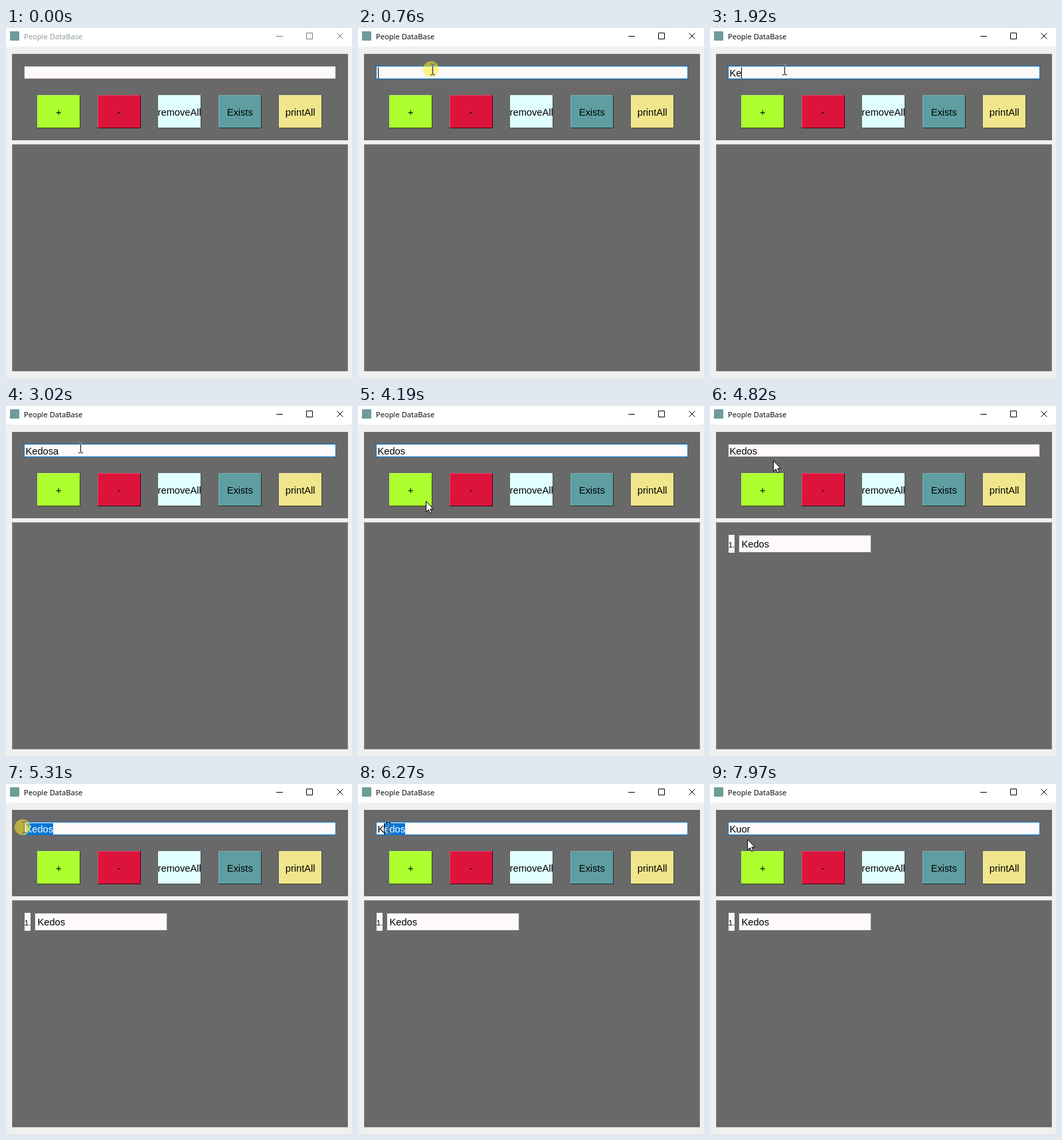
Write an HTML page that moves like this. It is 521 px wide and 527 px high and loops after 7990 ms.

```html
<!DOCTYPE html>
<html lang="en">
<head>
<meta charset="utf-8">
<title>People DataBase</title>
<style>
  html, body { margin: 0; width: 100%; height: 100%; overflow: hidden; background: #f0f0f0; }
  svg { display: block; }
  text { font: 14.667px "Liberation Sans", Arial, sans-serif; fill: #000; white-space: pre; }
  #title { font: 11.2px "Open Sans", "Noto Sans", sans-serif; }
  #beam { fill: none; stroke: #fff; mix-blend-mode: difference; }
  .mid { text-anchor: middle; }
</style>
</head>
<body>
<svg width="521" height="527" viewBox="0 0 521 527">
  <rect width="521" height="527" fill="#f0f0f0"/>
  <rect width="521" height="28" fill="#fff"/>
  <rect x="6" y="5" width="14" height="14" fill="#6d9c9c"/>
  <text id="title" x="27" y="17">People DataBase</text>
  <path id="chrome" d="M407 12.5H417M452.5 7.5H461.5V16.5H452.5ZM498.5 7.5L507.5 16.5M507.5 7.5L498.5 16.5" fill="none"/>

  <rect x="9" y="39" width="506" height="130" fill="#696969"/>
  <rect x="9.5" y="175.5" width="505" height="341" fill="#696969" stroke="#828790"/>
  <g id="buttons"></g>

  <rect id="field" x="27.5" y="57.5" width="469" height="19" fill="#fffafa"/>
  <rect id="mark" y="59" height="17" fill="#0078d7"/>
  <text x="29.5" y="73"><tspan id="plain"></tspan><tspan id="picked" fill="#fff"></tspan></text>
  <rect id="caret" y="59" width="1" height="17"/>

  <g id="item">
    <rect x="28" y="194" width="9" height="27" fill="#fffafa"/>
    <text x="27.7" y="213" style="font-size:11.5px">1.</text>
    <rect x="43.5" y="194.5" width="199" height="26" fill="#fffafa" stroke="#7a7a7a"/>
    <text x="47.5" y="213">Kedos</text>
  </g>

  <circle id="halo" r="12" fill="#fff01e" fill-opacity=".53"/>
  <path id="beam" d="M-3 -8.5H0M1 -8.5H4M-3 7.5H0M1 7.5H4M.5 -8V7"/>
  <path id="arrow" d="M.5 .5V16.5L4.2 13L6.8 18.6L9.2 17.5L6.7 12H11.5Z" fill="#fff" stroke="#000"/>
</svg>
<script>
const LOOP = 7990, BLINK = 530, TEXT_X = 29.5;
const CLICK = 760, ADD = 4340, GRAB = 4980, DROP = 6200, RETYPE = 7010;

const $ = id => document.getElementById(id);
const set = (id, attrs) => { for (const k in attrs) $(id).setAttribute(k, attrs[k]); };
const show = (id, on) => set(id, { visibility: on ? 'visible' : 'hidden' });
const between = (t, a, b) => t >= a && t < b;

const BUTTONS = { '+': '#adff2f', '-': '#dc143c', removeAll: '#e0ffff', Exists: '#5f9ea0', printAll: '#f0e68c' };
$('buttons').innerHTML = Object.entries(BUTTONS).map(([label, face], i) => {
  const x = 47 + 91 * i;
  return `<rect x="${x}" y="101" width="65" height="50" fill="${face}"/>
    <path d="M${x + .5} 150V101.5H${x + 64}" fill="none" stroke="#fff" stroke-opacity=".2"/>
    <path d="M${x} 150.5H${x + 64.5}V101" fill="none" stroke="#000" stroke-opacity=".7"/>
    <text class="mid" x="${x + 32.2}" y="132">${label}</text>`;
}).join('');

// bursts of keys: start, gap between keys, characters kept, keys
const BURSTS = [
  [1640, 0, 0, 'K'], [1920, 105, 1, 'edo'], [2420, 0, 4, 'sa'], [3360, 0, 5, ''],
  [RETYPE, 100, 1, 'uo'], [7270, 0, 3, 'r']
];
// pointer moves: start, end, and where they lead
const MOVES = [
  [20, 610, 112, 63], [3950, 4190, 102, 143], [4190, 4290, 95, 131], [4480, 4690, 98, 84],
  [4800, GRAB, 75, 67], [GRAB, 5360, 20, 66], [5550, 5860, 45, 67], [7850, 7970, 56, 83]
];

const pen = document.createElement('canvas').getContext('2d');
pen.font = '14.667px "Liberation Sans", Arial, sans-serif';
const endX = s => TEXT_X + pen.measureText(s).width;

function typedAt(t) {
  let text = '';
  for (const [start, gap, keep, keys] of BURSTS) {
    if (t < start) break;
    const count = gap ? Math.floor((t - start) / gap) + 1 : keys.length;
    text = text.slice(0, keep) + keys.slice(0, count);
  }
  return text;
}

function pointerAt(t) {
  let x = 380, y = 530;
  for (const [start, end, toX, toY] of MOVES) {
    const k = Math.min(1, Math.max(0, (t - start) / (end - start)));
    x += (toX - x) * k;
    y += (toY - y) * k;
  }
  return [Math.round(x), Math.round(y)];
}

// index of the character boundary closest to x
function boundary(text, x) {
  const gap = i => Math.abs(endX(text.slice(0, i)) - x);
  let best = 0;
  for (let i = 1; i <= text.length; i++) if (gap(i) < gap(best)) best = i;
  return best;
}

// every click and key restarts the blinking
function caretOn(t) {
  const last = Math.max(...[CLICK, DROP, ...BURSTS.map(b => b[0])].filter(s => s <= t));
  return (t - last) % (2 * BLINK) < BLINK;
}

function draw(t) {
  const text = typedAt(t);
  const [x, y] = pointerAt(t);
  const active = t >= CLICK;
  const focused = between(t, CLICK, ADD) || t >= GRAB;
  const dragging = between(t, GRAB, DROP);
  const hover = x >= 27 && x < 497 && y >= 57 && y < 77;

  set('title', { style: `fill:${active ? '#000' : '#8a9696'}` });
  set('chrome', { stroke: active ? '#000' : '#777' });
  set('field', { stroke: focused ? '#0078d7' : hover ? '#171717' : '#7a7a7a' });

  const cut = between(t, GRAB, RETYPE) ? boundary(text, x - 3) : text.length;
  const head = text.slice(0, cut);
  const left = Math.max(30, Math.floor(endX(head)));
  $('plain').textContent = head;
  $('picked').textContent = text.slice(cut);
  set('mark', { x: left, width: Math.max(0, Math.floor(endX(text)) - left) });
  show('mark', cut < text.length);
  set('caret', { x: left });
  show('caret', focused && !dragging && caretOn(t));
  show('item', t >= ADD + 100);

  const beam = hover || dragging;
  const at = `translate(${x} ${y})`;
  set('halo', { cx: x - 2, cy: y - 1 });
  show('halo', between(t, CLICK, CLICK + 50) || between(t, ADD, ADD + 100) || between(t, GRAB, DROP + 70));
  set('beam', { transform: at });
  show('beam', beam);
  set('arrow', { transform: at });
  show('arrow', !beam);
}

const start = performance.now();
function tick() {
  draw((performance.now() - start) % LOOP);
  requestAnimationFrame(tick);
}
tick();
</script>
</body>
</html>
```
